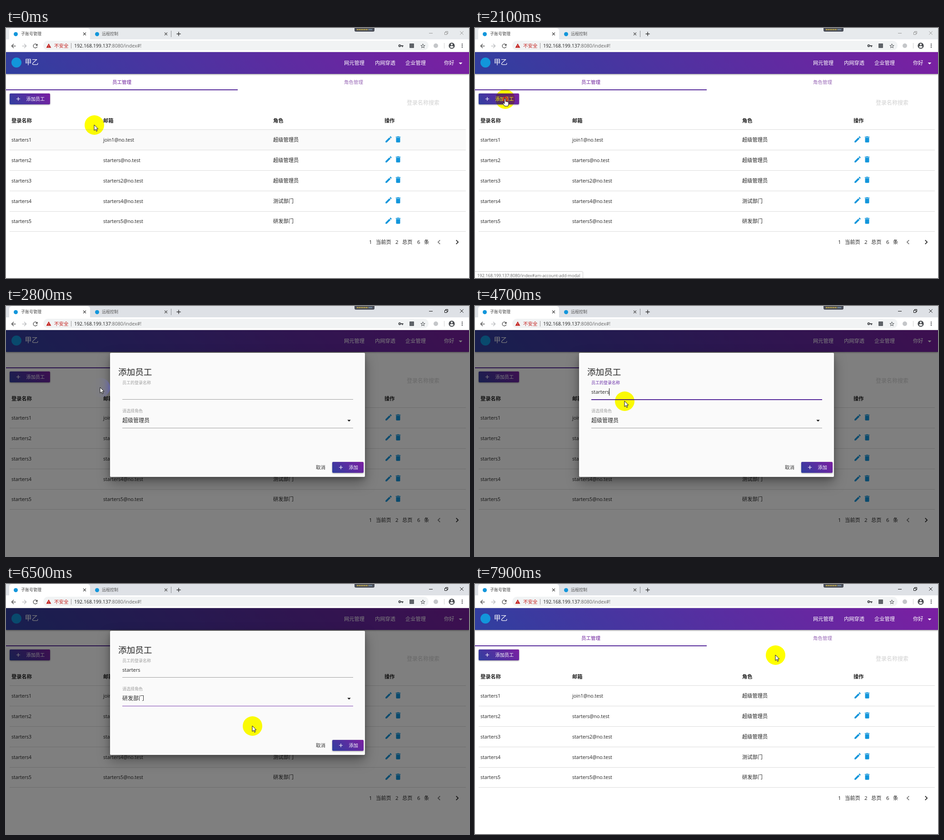
An HTML page that plays this animation: 1019 by 550 pixels, repeating every 8000 ms.

```html
<!DOCTYPE html>
<html lang="zh-CN">
<head>
<meta charset="utf-8">
<title>子账号管理</title>
<style>
  html, body { margin: 0; width: 100%; height: 100%; overflow: hidden; background: #fff; }
  #stage {
    position: relative; width: 1019px; height: 550px; overflow: hidden; isolation: isolate; background: #fff;
    font-family: "Open Sans", "Noto Sans CJK SC", "Noto Sans CJK", sans-serif; color: #222;
  }
  #stage div, #stage svg { position: absolute; }
  .text { white-space: nowrap; line-height: 24px; }
  .grad { background: linear-gradient(45deg, #303f9f, #7b1fa2); }
  .button { border-radius: 2px; box-shadow: 0 1px 3px rgba(0,0,0,.4); }
  .layer { left: 0; top: 0; width: 1019px; height: 550px; }
  #modal { transform-origin: 509.5px 239.5px; }
  #menu { transform-origin: 256px 234px; }
  #spot { width: 43px; height: 43px; margin: -21.5px; border-radius: 50%; background: #00f; mix-blend-mode: difference; }
  #ring { width: 7px; height: 7px; margin: -5px; border-radius: 50%; border: 2px solid #e01818; }
  #status { left: -1px; top: 535px; height: 15px; line-height: 17px; padding: 0 5px; font-size: 9.2px;
    color: #666; background: #fff; border: 1px solid #ccc; border-radius: 0 3px 0 0; white-space: nowrap; }
</style>
</head>
<body>
<div id="stage"></div>
<script>
const BLUE = '#1296db';
const PURPLE = '#55289a';
const HOST = '192.168.199.137';
const stage = document.getElementById('stage');

// Markup helpers; text is placed by its left edge and vertical centre.
const box = (x, y, w, h, css = '', attrs = '') =>
  `<div ${attrs} style="left:${x}px;top:${y}px;width:${w}px;height:${h}px;${css}"></div>`;
const text = (x, y, size, content, css = '', id = '') =>
  `<div class="text" id="${id}" style="left:${x}px;top:${y - 12}px;font-size:${size}px;${css}">${content}</div>`;
const dot = (x, y, r, color) => box(x - r, y - r, 2 * r, 2 * r, `border-radius:50%;background:${color}`);
const icon = (x, y, size, path, color) =>
  `<svg viewBox="0 0 24 24" width="${size}" height="${size}" style="left:${x - size / 2}px;top:${y - size / 2}px" fill="${color}"><path d="${path}"/></svg>`;
const line = (path, color, width = 1.2, attrs = '') =>
  `<path d="${path}" fill="none" stroke="${color}" stroke-width="${width}" ${attrs}/>`;
const cross = (x, y, r, color, width = 1.2) =>
  line(`M${x - r} ${y - r}l${2 * r} ${2 * r}m0 ${-2 * r}l${-2 * r} ${2 * r}`, color, width);
const canvas = (content, attrs = '') => `<svg width="1019" height="550" style="left:0;top:0" ${attrs}>${content}</svg>`;
const button = (x, y, w, h, label) =>
  box(x, y, w, h, '', 'class="grad button"') +
  icon(x + 18.5, y + 12, 14, PLUS, '#fff') +
  text(x + 36.5, y + 12, 10.2, label, 'color:#fff;font-weight:500');

const PLUS = 'M19 13h-6v6h-2v-6H5v-2h6V5h2v6h6z';
const EDIT = 'M3 17.25V21h3.75L17.81 9.94l-3.75-3.75zM20.71 7.04c.39-.39.39-1.02 0-1.41l-2.34-2.34c-.39-.39-1.02-.39-1.41 0l-1.83 1.83 3.75 3.75z';
const TRASH = 'M6 19c0 1.1.9 2 2 2h8c1.1 0 2-.9 2-2V7H6zM19 4h-3.5l-1-1h-5l-1 1H5v2h14z';
const DOWN = 'M7 10l5 5 5-5z';
const LEFT = 'M15.41 7.41L14 6l-6 6 6 6 1.41-1.41L10.83 12z';
const RIGHT = 'M8.59 16.59L10 18l6-6-6-6-1.41 1.41L13.17 12z';
const BACK = 'M20 11H7.83l5.59-5.59L12 4l-8 8 8 8 1.41-1.41L7.83 13H20z';
const FORWARD = 'M12 4l-1.41 1.41L16.17 11H4v2h12.17l-5.58 5.59L12 20l8-8z';
const RELOAD = 'M17.65 6.35A8 8 0 1 0 19.73 14h-2.08A6 6 0 1 1 12 6c1.66 0 3.14.69 4.22 1.78L13 11h7V4z';
const WARN = 'M1 21h22L12 2zm12-3h-2v-2h2zm0-4h-2v-4h2z';
const KEY = 'M12.65 10a6 6 0 1 0 0 4H17v4h4v-4h2v-4zM7 14a2 2 0 1 1 0-4 2 2 0 0 1 0 4z';
const STAR = 'M22 9.24l-7.19-.62L12 2 9.19 8.63 2 9.24l5.46 4.73L5.82 21 12 17.27 18.18 21l-1.63-7.03zM12 15.4l-3.76 2.27 1-4.28-3.32-2.88 4.38-.38L12 6.1l1.71 4.04 4.38.38-3.32 2.88 1 4.28z';
const PERSON = 'M12 2a10 10 0 1 0 0 20 10 10 0 0 0 0-20zm0 3a3 3 0 1 1 0 6 3 3 0 0 1 0-6zm0 14.2a7.2 7.2 0 0 1-6-3.22c.03-1.99 4-3.08 6-3.08s5.97 1.09 6 3.08a7.2 7.2 0 0 1-6 3.22z';
const DOTS = 'M12 8a2 2 0 1 0 0-4 2 2 0 0 0 0 4zm0 2a2 2 0 1 0 0 4 2 2 0 0 0 0-4zm0 6a2 2 0 1 0 0 4 2 2 0 0 0 0-4z';

const ROLES = ['超级管理员', '测试部门', '研发部门'];
const STAFF = [['join1', 0], ['starters', 0], ['starters2', 0], ['starters4', 1], ['starters5', 2]];

const browser =
  box(0, 0, 1019, 26, '', 'id="strip"') +
  box(7, 0, 178, 26, 'background:#fff;border-radius:6px 6px 0 0') +
  dot(21, 13, 4.5, BLUE) + text(33, 13, 9, '子账号管理', 'color:#444') +
  dot(200, 13, 4.5, BLUE) + text(211, 13, 9, '远程控制', 'color:#555') +
  box(363, 6, 1, 14, 'background:#8a8d91') +
  box(767, -4, 44, 12, 'background:#4b4e58;border-radius:3px') +
  box(772, 2, 25, 3, 'background:repeating-linear-gradient(90deg,#b5a04a 0 3px,#4b4e58 3px 4px)') +
  box(798, 2, 8, 3, 'background:#6d8296') +
  canvas(cross(173, 13, 3, '#444') + cross(352, 13, 3, '#555') + line('M375.5 13h9m-4.5-4.5v9', '#333', 1.4)) +
  canvas(line('M931 11.5h8M965.5 9.5h5v5h-5zM967.5 9.5v-2h5v5h-2', 'currentColor', 1) +
    cross(1003, 11, 3.7, 'currentColor', 1), 'id="controls"') +
  box(0, 25, 1019, 28, 'background:#fff') +
  box(82, 28, 848, 21, 'background:#f1f3f4;border-radius:11px') +
  icon(16, 39, 15, BACK, '#444') + icon(40, 39, 15, FORWARD, '#b5b7ba') + icon(64, 39, 15, RELOAD, '#444') +
  icon(94, 39, 12, WARN, '#c5221f') + text(106, 39, 10.5, '不安全', 'color:#c5221f') +
  box(143, 33, 1, 12, 'background:#999') +
  text(150, 39, 10.55, `${HOST}<span style="color:#666">:8080/index#!</span>`) +
  icon(869, 39, 12, KEY, '#4a4d51') + box(888, 34, 10, 10, 'background:#5f6368;border-radius:1px') +
  icon(917, 39, 13, STAR, '#4a4d51') + dot(946, 39, 5, '#c4c6c9') +
  box(964, 33, 1, 12, 'background:#d0d0d0') +
  icon(981, 39, 16, PERSON, '#4a4d51') + icon(1004, 39, 14, DOTS, '#4a4d51');

const navLink = (x, label) => text(x, 77, 11.25, label, 'color:#fff;font-weight:500');
const page =
  box(0, 53, 1019, 48, 'box-shadow:0 1px 3px rgba(0,0,0,.45)', 'class="grad"') +
  dot(23, 76, 11, BLUE) + text(41.5, 74, 15, '甲乙', 'color:#fff') +
  navLink(744, '网元管理') + navLink(812, '内网穿透') + navLink(879, '企业管理') + navLink(964, '你好') +
  icon(1000, 77, 19, DOWN, '#fff') +
  text(234, 119, 10.5, '员工管理', 'color:#6a1b9a') + text(744, 119, 10.5, '角色管理', 'color:#9b6bb8') +
  box(0, 135, 510, 2, `background:${PURPLE}`) +
  button(8, 144, 89, 24, '添加员工') +
  text(882, 165, 12, '登录名称搜索', 'color:#d0d0d0') +
  [[12, '登录名称'], [214, '邮箱'], [588, '角色'], [833, '操作']]
    .map(([x, label]) => text(x, 204, 11.25, label, 'font-weight:700')).join('') +
  box(8, 224, 1004, 44, 'background:#fafafa', 'id="hover"') +
  box(8, 223, 1004, 1, 'background:#dcdcdc') +
  STAFF.map(([mail, role], i) => {
    const y = 246 + i * 44.85;
    return text(12, y, 10.6, `starters${i + 1}`) + text(214, y, 10.6, `${mail}@no.test`) +
      text(588, y, 11.25, ROLES[role]) +
      icon(842, y - 1.5, 18, EDIT, BLUE) + icon(863, y - 1.5, 18, TRASH, BLUE) +
      box(8, Math.round(y + 22), 1004, 1, 'background:#dcdcdc');
  }).join('') +
  [[799, 1], [857, 2], [905, 6]].map(([x, n]) => text(x, 471, 11.5, n)).join('') +
  [[814, '当前页'], [872, '总页'], [920, '条']].map(([x, label]) => text(x, 471, 11.25, label)).join('') +
  icon(953, 471, 20, LEFT, '#777') + icon(993, 471, 20, RIGHT, '#222');

const modal =
  box(229, 103, 561, 273, 'background:#fafafa;border-radius:2px;box-shadow:0 12px 28px rgba(0,0,0,.35),0 4px 10px rgba(0,0,0,.2)') +
  text(247, 145, 18.6, '添加员工') +
  text(256, 169, 9, '员工的登录名称', '', 'nameLabel') +
  text(256, 189, 11, 'starters', '', 'nameValue') +
  box(256, 181, 1, 16, 'background:#111', 'id="caret"') +
  box(256, 205, 508, 1, '', 'id="nameLine"') +
  text(256, 231, 9, '请选择角色', 'color:#9e9e9e') +
  text(256, 252, 12, '', '', 'roleValue') + icon(755, 252, 18, DOWN, '#111') +
  box(256, 268, 508, 1, '', 'id="roleLine"') +
  box(669, 343, 45, 24, 'background:rgba(60,140,90,.22);border-radius:2px', 'id="ripple"') +
  text(682, 355, 10.5, '取消', 'color:#333') +
  button(718, 343, 69, 24, '添加');

const menu =
  box(256, 234, 508, 112.5, 'background:#fff;border-radius:2px;box-shadow:0 2px 5px rgba(0,0,0,.3)') +
  box(256, 234, 508, 37.5, 'background:#eee', 'id="option"') +
  ROLES.map((role, i) => text(268, 252.75 + i * 37.5, 12, role, 'color:#6a1b9a')).join('');

const ARROW = 'M0 0v12.5l2.9-2.7 2 4.4 2-.9-2-4.3h4z';
const HAND = 'M-1.3 1c0-1.5 2.6-1.5 2.6 0v5c.5-.8 2.3-.6 2.4.4.6-.7 2.2-.4 2.3.6.7-.5 1.9 0 1.9 1.2v3.6l-1.4 4.2h-7l-3.9-5.4c-.9-1.4.9-2.6 2-1.3l1.1 1.3z';
const BEAM = 'M-2.5-7h2l.5.5.5-.5h2M0-6.5v13M-2.5 7h2l.5-.5.5.5h2';
const pointer = `<svg id="pointer" width="1" height="1" style="overflow:visible"><path id="shape" stroke="#111"/></svg>`;

stage.innerHTML = browser + page +
  box(0, 53, 1019, 497, 'background:#000', 'id="shade"') +
  `<div id="modal" class="layer">${modal}</div><div id="menu" class="layer">${menu}</div>` +
  '<div id="status"></div><div id="spot"></div><div id="ring"></div>' + pointer;

const el = {};
stage.querySelectorAll('[id]').forEach(node => { if (node.id) el[node.id] = node; });

// Pointer stops: time, x, y.
const PATH = [
  [0, 194, 213], [700, 66, 156], [2200, 66, 156], [2800, 207, 179], [2950, 207, 179], [3300, 290, 180],
  [4450, 290, 180], [4700, 329, 209], [5100, 520, 252], [5400, 520, 252], [6000, 542, 312], [6500, 542, 312],
  [6900, 678, 351], [7300, 678, 351], [7900, 661, 156], [8000, 661, 156]
];
const CLICKS = [2100, 3300, 5100, 6200, 7100];

const clamp = v => Math.min(1, Math.max(0, v));
const easeOut = v => 1 - (1 - clamp(v)) ** 3;
const between = (t, a, b) => t >= a && t < b;
const show = (node, on) => { node.style.visibility = on ? 'visible' : 'hidden'; };

function pointerAt(t) {
  const i = PATH.findIndex(stop => stop[0] > t);
  const [t0, x0, y0] = PATH[i - 1], [t1, x1, y1] = PATH[i];
  const u = (t - t0) / (t1 - t0), k = u * u * (3 - 2 * u);
  return [x0 + (x1 - x0) * k, y0 + (y1 - y0) * k];
}

function render(t) {
  const active = t >= 2200;
  el.strip.style.background = active ? '#dee1e6' : '#e7eaed';
  el.controls.style.color = active ? '#111' : '#999';
  show(el.hover, t < 200);

  const open = t < 7200 ? easeOut((t - 2150) / 250) : 1 - easeOut((t - 7215) / 250);
  el.shade.style.opacity = open ** 1.2 * .5;
  el.modal.style.opacity = open;
  el.modal.style.transform = `translateY(${-30 * (1 - open)}px) scale(${.8 + .2 * open})`;

  const focused = between(t, 3300, 5100), typed = t >= 4500;
  el.nameLabel.style.color = focused ? '#6a2fa8' : '#9e9e9e';
  el.nameLine.style.background = focused ? PURPLE : '#9e9e9e';
  el.nameLine.style.boxShadow = focused ? `0 1px 0 ${PURPLE}` : 'none';
  el.nameValue.style.display = typed ? '' : 'none';
  el.caret.style.left = (typed ? 295 : 256) + 'px';
  el.caret.style.display = focused && !between(t, 3800, 4300) ? '' : 'none';
  el.roleValue.textContent = ROLES[t < 6300 ? 0 : 2];
  el.roleLine.style.background = t < 5100 ? '#9e9e9e' : '#7b3fb0';
  el.ripple.style.display = t >= 7100 ? '' : 'none';

  const [x, y] = pointerAt(t);
  const drop = easeOut((t - 5150) / 200) * (1 - easeOut((t - 6200) / 100));
  el.menu.style.opacity = drop;
  el.menu.style.transform = `scale(${.3 + .7 * drop})`;
  el.option.style.top = 234 + 37.5 * Math.min(2, Math.max(0, Math.floor((y - 234) / 37.5))) + 'px';

  const link = between(t, 600, 2300) ? 'am-account-add-modal' : between(t, 6900, 7500) ? '!' : '';
  el.status.textContent = `${HOST}:8080/index#${link}`;
  show(el.status, link);

  for (const node of [el.spot, el.ring, el.pointer]) {
    node.style.left = x + 'px';
    node.style.top = y + 'px';
  }
  show(el.ring, CLICKS.some(click => between(t, click, click + 200)));
  const beam = between(t, 3150, 4600);
  const hand = between(t, 600, 2300) || between(t, 5000, 6300) || between(t, 6800, 7200);
  el.shape.setAttribute('d', beam ? BEAM : hand ? HAND : ARROW);
  el.shape.setAttribute('fill', beam ? 'none' : '#fff');
}

function tick() {
  render(Math.floor(performance.now() / 100) % 80 * 100);
  requestAnimationFrame(tick);
}
tick();
</script>
</body>
</html>
```
